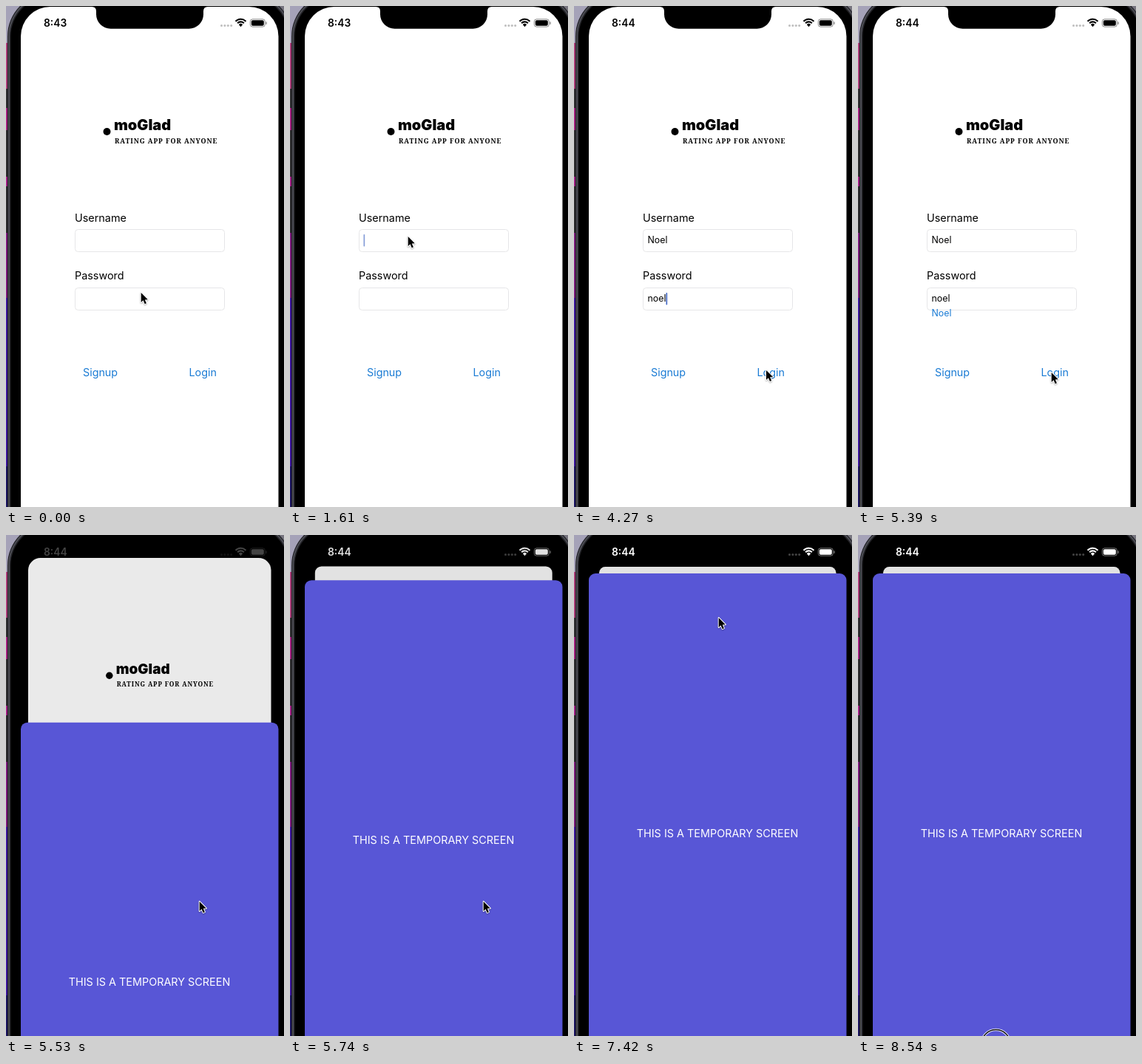
These frames come from a looping animation (376x678 px, 8610 ms). An HTML page with a canvas:

```html
<!DOCTYPE html>
<html lang="en">
<head>
<meta charset="utf-8">
<title>Login flow</title>
<style>
  html, body { margin: 0; width: 100%; height: 100%; overflow: hidden; background: #000; }
  canvas { display: block; width: 376px; height: 678px; }
</style>
</head>
<body>
<canvas id="stage" width="376" height="678"></canvas>
<script>
const ctx = document.getElementById('stage').getContext('2d');
const LOOP = 8610, STEP = 70;
const SANS = 'Inter, sans-serif';
const BLUE = '#1a7bd4', INDIGO = '#5856d6';
const SCREEN = { x: 20, y: 1, w: 348.5, h: 754, r: 40 };

const clamp = v => Math.max(0, Math.min(1, v));
const mix = (a, b, p) => a + (b - a) * p;
const ramp = (t, from, to) => clamp((t - from) / (to - from));
const smooth = p => p * p * (3 - 2 * p);
const grey = v => `rgb(${v}, ${v}, ${v})`;

function box(x, y, w, h, r, fill) {
  ctx.beginPath();
  ctx.roundRect(x, y, w, h, r);
  if (fill) { ctx.fillStyle = fill; ctx.fill(); }
}

function disc(x, y, r, fill) {
  ctx.beginPath();
  ctx.arc(x, y, r, 0, Math.PI * 2);
  ctx.fillStyle = fill;
  ctx.fill();
}

function text(str, x, y, size, color = '#000', weight = 400, family = SANS) {
  ctx.font = `${weight} ${size}px ${family}`;
  ctx.fillStyle = color;
  ctx.fillText(str, x, y);
}

// Each entry: time a leg ends, then the pointer tip.
const POINTER = [
  [0, 182, 387], [910, 159, 311],
  [3430, 159, 311], [4340, 261, 495],
  [6090, 261, 495], [6300, 141, 182], [6790, 195.5, 110],
  [7350, 195.5, 110], [7420, 195, 111],
  [7630, 195, 111], [7930, 223, 370], [8190, 186, 682]
];

function pointerAt(t) {
  const i = POINTER.findIndex(k => k[0] > t);
  if (i < 0) return POINTER.at(-1).slice(1);
  const [a, b] = [POINTER[i - 1], POINTER[i]];
  const p = smooth(ramp(t, a[0], b[0]));
  return [mix(a[1], b[1], p), mix(a[2], b[2], p)];
}

function drawPointer(t) {
  const [x, y] = pointerAt(t);
  ctx.save();
  ctx.translate(x, y);
  ctx.beginPath();
  [[0.7, 1], [0.7, 14], [3.6, 11.3], [5.7, 16.2], [7.9, 15.2], [5.8, 10.4], [9.8, 10.2]]
    .forEach(p => ctx.lineTo(...p));
  ctx.closePath();
  ctx.lineJoin = 'round';
  ctx.shadowColor = 'rgba(0, 0, 0, .3)';
  ctx.shadowBlur = 2;
  ctx.shadowOffsetY = 1;
  ctx.strokeStyle = '#fff';
  ctx.lineWidth = 2;
  ctx.stroke();
  ctx.shadowColor = 'transparent';
  ctx.fillStyle = '#000';
  ctx.fill();
  ctx.restore();
}

// Device outline, grown outwards from the screen edge.
function shell(grow, fill) {
  const { x, y, w, h, r } = SCREEN;
  box(x - grow, y - grow, w + 2 * grow, h + 2 * grow, r + grow, fill);
}

function drawBackdrop() {
  const bands = [
    [0, '#a5a2b8'], [50, '#a93c78'], [112, '#303032'], [138, '#a2207f'],
    [168, '#2f2f31'], [231, '#a01f84'], [244, '#2c2c2e'], [307, '#7c1a7c'],
    [395, '#3c169c'], [623, '#1b1560']
  ];
  for (const [y, color] of bands) {
    ctx.fillStyle = color;
    ctx.fillRect(0, y, 40, 678 - y);
  }
  ctx.fillStyle = '#77757f';
  ctx.fillRect(340, 0, 36, 40);
  shell(18, '#1c1c20');
  shell(17, '#4c4d54');
  shell(15, '#232327');
  shell(13.5, '#000');
}

const typed = (word, times, t) => word.slice(0, times.filter(k => t >= k).length);

function field(y, value, caret) {
  box(93.5, y + .5, 202, 30, 4);
  ctx.strokeStyle = '#e6e6e8';
  ctx.lineWidth = 1;
  ctx.stroke();
  text(value, 99.5, y + 19.2, 12.4);
  if (caret <= 0) return;
  const x = 99.5 + ctx.measureText(value).width;
  ctx.globalAlpha = caret;
  box(x, y + 7, 1.7, 16.5, .8, '#4469c4');
  ctx.globalAlpha = 1;
}

function userCaret(t) {
  if (t < 1680) return ramp(t, 910, 1050) * (1 - .35 * ramp(t, 1540, 1610));
  return 1 - ramp(t, 2380, 2520);
}

function passCaret(t) {
  if (t < 3640) return ramp(t, 2450, 2590);
  const blink = ramp(t, 3920, 4060) - ramp(t, 3640, 3780) + 1;
  return blink - ramp(t, 4620, 4760);
}

function drawLogin(t) {
  disc(136.5, 170, 5, '#000');
  text('moGlad', 146, 168, 20, '#000', 900);
  ctx.letterSpacing = '0.9px';
  text('RATING APP FOR ANYONE', 147, 185.5, 9, '#000', 900, '"Noto Serif", serif');
  ctx.letterSpacing = '0px';

  text('Username', 93, 291.5, 14.4);
  field(302, typed('Noel', [1750, 1960, 2100, 2240], t), userCaret(t));
  text('Password', 93, 370.3, 14.4);
  field(381, typed('noel', [2730, 2940, 3080, 3220], t), passCaret(t));

  ctx.globalAlpha = ramp(t, 5040, 5250);
  text('Noel', 99.5, 419.5, 12.4, BLUE);
  ctx.globalAlpha = 1 - .8 * (ramp(t, 4340, 4480) - ramp(t, 4620, 4900));
  text('Login', 247.5, 501, 14.3, BLUE);
  ctx.globalAlpha = 1;
  text('Signup', 104, 501, 14.3, BLUE);
}

// Critically damped spring.
function sheetProgress(t) {
  const s = Math.max(0, t - 5393) / 1000 * 18.26;
  return t >= 5950 ? 1 : 1 - (1 + s) * Math.exp(-s);
}

function drawCard(t, p) {
  const scale = 1 - p * 28 / SCREEN.w;
  ctx.save();
  ctx.translate(SCREEN.x + 14 * p, SCREEN.y + 42 * p);
  ctx.scale(scale, scale);
  ctx.translate(-SCREEN.x, -SCREEN.y);
  box(SCREEN.x, SCREEN.y, SCREEN.w, SCREEN.h, mix(SCREEN.r, 9, p), '#fff');
  ctx.clip();
  drawLogin(t);
  ctx.fillStyle = `rgba(0, 0, 0, ${.115 * p})`;
  ctx.fillRect(0, 0, 376, 800);
  ctx.restore();
}

function drawSheet(p) {
  if (p <= 0) return;
  const top = mix(755, 52, p);
  box(SCREEN.x, top, SCREEN.w, 800, 9, INDIGO);
  ctx.textAlign = 'center';
  text('THIS IS A TEMPORARY SCREEN', 194, top + 356.7, 14.4, '#fff');
  ctx.textAlign = 'left';
}

function drawNotch() {
  ctx.beginPath();
  ctx.moveTo(116, 0);
  ctx.lineTo(116, 1);
  ctx.quadraticCurveTo(122, 1, 122, 7);
  ctx.lineTo(122, 11);
  ctx.arcTo(122, 30.8, 141, 30.8, 19.5);
  ctx.arcTo(267, 30.8, 267, 11, 19.5);
  ctx.lineTo(267, 7);
  ctx.quadraticCurveTo(267, 1, 273, 1);
  ctx.lineTo(273, 0);
  ctx.fillStyle = '#000';
  ctx.fill();
}

function drawStatus(t) {
  const light = ramp(t, 5440, 5780);
  const ink = grey(Math.round(255 * light));
  text(t < 3150 ? '8:43' : '8:44', 51, 28, 13.8, ink, 600);

  const dots = grey(Math.round(t < 5420 ? 190 : 68 * light));
  for (let i = 0; i < 4; i++) disc(291.5 + i * 4.4, 26.6, 1.5, dots);

  ctx.strokeStyle = ink;
  ctx.lineWidth = 2.1;
  for (const r of [9.6, 6]) {
    ctx.beginPath();
    ctx.arc(317.5, 27.4, r, -Math.PI * .76, -Math.PI * .24);
    ctx.stroke();
  }
  ctx.beginPath();
  ctx.moveTo(317.5, 28.3);
  ctx.arc(317.5, 27.6, 3.6, -Math.PI * .76, -Math.PI * .24);
  ctx.fillStyle = ink;
  ctx.fill();

  ctx.globalAlpha = .45;
  box(330.3, 17.8, 20, 10.4, 3.2);
  ctx.lineWidth = 1;
  ctx.stroke();
  box(351.4, 21.2, 1.4, 3.8, .7, ink);
  ctx.globalAlpha = 1;
  box(331.8, 19.3, 17, 7.4, 1.9, ink);
}

function drawTouch(t) {
  if (t < 8540) return;
  for (const [width, color] of [[3.4, '#e4e4f4'], [1.6, '#111']]) {
    ctx.beginPath();
    ctx.arc(186.5, 689, 19.5, 0, Math.PI * 2);
    ctx.strokeStyle = color;
    ctx.lineWidth = width;
    ctx.stroke();
  }
}

function render(now) {
  const t = Math.floor((now % LOOP) / STEP) * STEP;
  const p = sheetProgress(t);
  drawBackdrop();
  drawCard(t, p);
  drawSheet(p);
  drawNotch();
  drawStatus(t);
  drawPointer(t);
  drawTouch(t);
}

let start;
function tick(now) {
  start ??= now;
  render(now - start);
  requestAnimationFrame(tick);
}
render(0);
requestAnimationFrame(tick);
</script>
</body>
</html>
```
